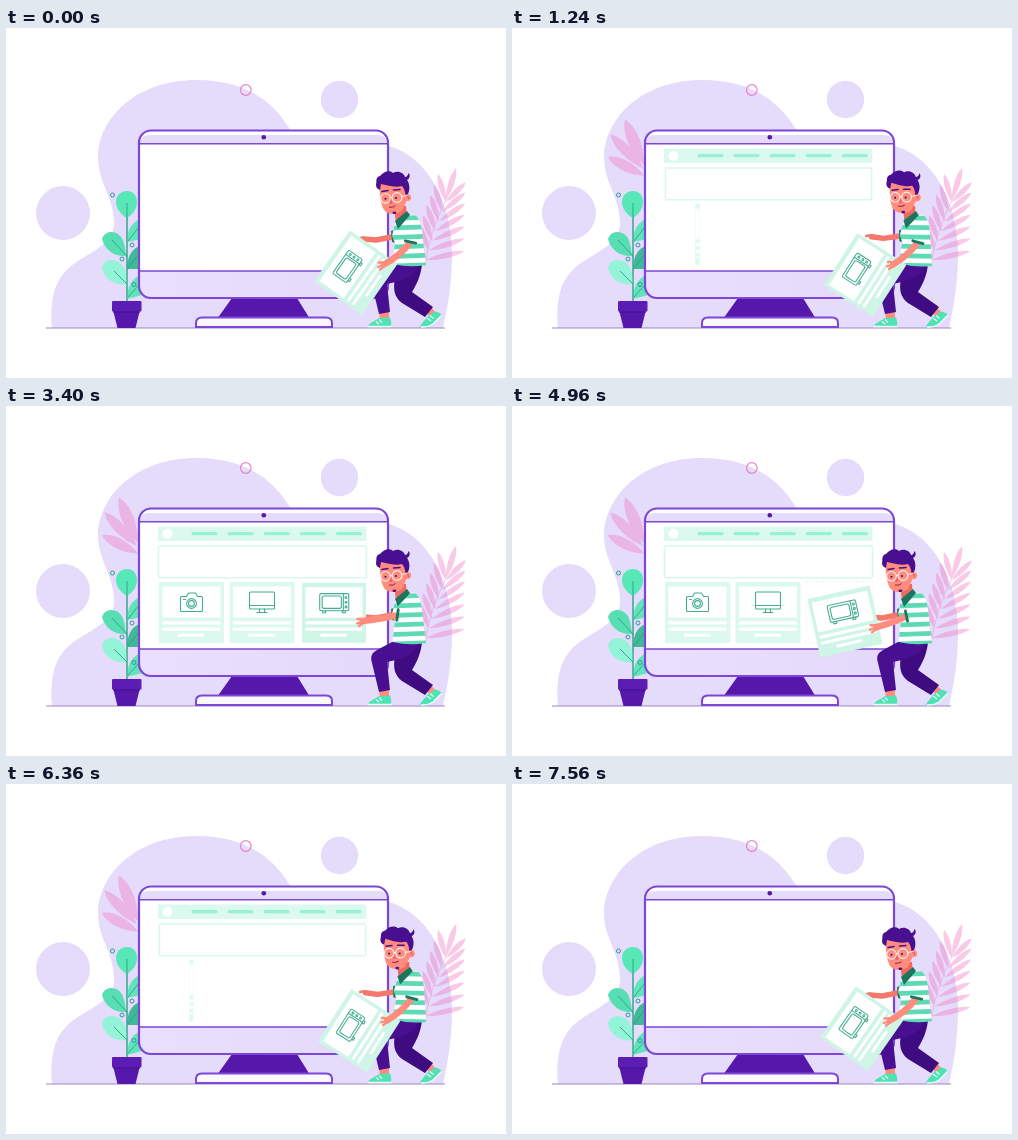
Recreate the animation shown at these times as an HTML page. Size 500x350 px, loop 7600 ms.

```html
<!DOCTYPE html>
<html lang="en">
<head>
<meta charset="utf-8">
<title>Building a shop page</title>
<style>
  html, body { margin: 0; width: 100%; height: 100%; overflow: hidden; background: #fff; }
  svg { display: block; width: 100vw; height: 100vh; }
  .icon { fill: none; stroke: #42ad90; stroke-width: 1.1; stroke-linejoin: round; stroke-linecap: round; }
  .pink { fill: #f07cc4; opacity: .4; }
  .skin { fill: #ff8c7d; }
  .round { fill: none; stroke-linecap: round; stroke-linejoin: round; }
</style>
</head>
<body>
<svg id="stage" viewBox="0 0 500 350"></svg>
<script>
const LOOP = 7600;
const PURPLE = '#7c46d8', DEEP = '#5518aa', HAIR = '#480f90', LILAC = '#e5dbfa', MINT = '#dbf9ef';

// Pointed leaf from base to tip, bulging by w on both sides.
function leaf(x, y, tx, ty, w) {
  const dx = tx - x, dy = ty - y, len = Math.hypot(dx, dy);
  const nx = -dy / len * w, ny = dx / len * w;
  const at = (k, side) => `${(x + dx * k + nx * side).toFixed(1)} ${(y + dy * k + ny * side).toFixed(1)}`;
  return `M${x} ${y}C${at(.35, 1)} ${at(.78, 1)} ${tx} ${ty}C${at(.78, -1)} ${at(.35, -1)} ${x} ${y}Z`;
}

function frond() {
  let d = '';
  for (let i = 0; i < 7; i++) {
    const k = i / 6, x = 420 + 18 * k + 2 * k * k, y = 232 - 58 * k;
    const add = (deg, len) => {
      const a = deg * Math.PI / 180;
      d += leaf(x, y, x + len * Math.cos(a), y + len * Math.sin(a), 3.7);
    };
    add(-13 - 32 * k, 39 - 11 * k);
    add(-112 + 6 * k, 26 + 3 * k);
  }
  d += leaf(440, 172, 450, 140, 4);
  return `<g class="pink"><path d="${d}"/><path d="M419 238Q423 205 441 170" fill="none" stroke="#f07cc4"/></g>`;
}

const rect = (x, y, w, h, fill, r = 0) =>
  `<rect x="${x}" y="${y}" width="${w}" height="${h}" rx="${r}" fill="${fill}"/>`;
const ring = (x, y, r, color, w) =>
  `<circle cx="${x}" cy="${y}" r="${r}" fill="none" stroke="${color}" stroke-width="${w}"/>`;

// Product card centred on the origin.
function productCard(icon, fill) {
  return rect(-32.5, -30.5, 65, 61, fill, 1.5) + rect(-29, -26, 58, 31, '#fff') +
    rect(-29, 8.7, 58, 3.2, '#fff', 1) + rect(-29, 15, 58, 3.2, '#fff', 1) +
    rect(-14, 21.3, 27, 3, '#fff', 1) + `<g class="icon">${icon}</g>`;
}

const camera = `<path d="M-10-16h5l2-3.5h7l2 3.5h4q1 0 1 1v13q0 1-1 1h-20q-1 0-1-1v-13q0-1 1-1z"/>
  <circle cy="-9" r="4.9"/><circle cy="-9" r="2.9"/><path d="M-8-13h2"/>`;
const monitor = `<rect x="-12.5" y="-20.5" width="25" height="17" rx="1"/>
  <path d="M-12.5-7h25M-2.5-3.5v3.5M2.5-3.5v3.5M-5 0h10"/>`;
const microwave = `<rect x="-14.5" y="-19.5" width="29.5" height="17.5" rx="1.5"/>
  <rect x="-12" y="-17" width="19.5" height="12.5" rx="2"/>
  <path d="M9.5-19.5v17.5M-11.5-2v2h3v-2M8.5-2v2h3v-2"/>
  <circle cx="12.2" cy="-15.5" r="1"/><circle cx="12.2" cy="-10.7" r="1"/><circle cx="12.2" cy="-6" r="1"/>`;

const navItems = [0, 1, 2, 3, 4].map(i => rect(185.5 + 36.1 * i, 126, 26, 3.3, '#97f1d3', 1.6)).join('');

const plant = `
  <path d="M121 275V178M121 229L105 214M121 255L104 240M121 238L132 226M121 212L132 198M121 268L132 256" stroke="#38ad8f" fill="none"/>
  <path d="M121 190C114 186 110 180 110 174C110 167 115 163 121 163C127 163 131 167 131 174C131 181 127 186 121 190Z" fill="#58e8b7"/>
  <path d="M120 228C110 229 99 223 96 211C98 204 106 202 112 206C118 210 119 219 120 228Z" fill="#57dfb3"/>
  <path d="M121 256C110 258 98 252 96 239C99 231 108 230 114 235C120 240 121 248 121 256Z" fill="#93f4d7"/>
  <path d="M121 214C121 203 125 194 136 190V211Z" fill="#61e4ba"/>
  <path d="M121 241C121 230 125 220 136 217V241Z" fill="#40b999"/>
  <path d="M121 271C121 259 126 250 136 246V267Z" fill="#61e4ba"/>
  <path d="M121 175V275M121 228L106 212M121 256L108 243M122 213L133 199M122 240L133 226M122 269L133 257" stroke="#30a088" stroke-width=".9" fill="none"/>
  ${[[106.5, 167], [126, 217], [116, 231], [128, 256.5]].map(([x, y]) => ring(x, y, 2, '#2b9c9b', 1)).join('')}
  <path d="M107 282H134L129.5 300H111.5Z" fill="${DEEP}"/>${rect(106, 273, 29.5, 10.5, '#5b1db3', 1)}
  <path d="M107 284H134" stroke="#43108c"/>`;

const computer = `
  <path d="M226 270H291L304 291H211Z" fill="${DEEP}"/>
  <path d="M190 299V295Q190 289.500 196 289.500H320Q326 289.500 326 295V299Z" fill="#fbf9ff" stroke="${PURPLE}" stroke-width="2"/>
  <rect x="133" y="102.500" width="249" height="167.500" rx="12" fill="#fff"/>
  <path d="M134 115.500V114Q135 107 143 107H372Q380 107 381 114V115.500Z" fill="${LILAC}"/>
  <path d="M133 243H382V258Q382 270 370 270H145Q133 270 133 258Z" fill="url(#chin)"/>
  <path d="M133 115.700H382M133 243H382" stroke="${PURPLE}" stroke-width="1.500"/>
  <rect x="133" y="102.500" width="249" height="167.500" rx="12" fill="none" stroke="${PURPLE}" stroke-width="2.200"/>
  <circle cx="257.800" cy="109.300" r="2.300" fill="${DEEP}"/>`;

const legs = `
  <path d="M373 283L374 293H383L383 282Z M420 283L424 290L430 285L425 279Z" class="skin"/>
  <path d="M391 236L416 236C415 247 411 256 406 264L427 279L419 289L396 275C388 269 387 261 389 250Z" fill="#3f0b80"/>
  <path d="M386 236H413C410 248 400 252 381 256L384 284L373 286L366 257C364 250 366 247 371 244Z" fill="${HAIR}"/>
  <path d="M362 299C362 295 368 294 373 290L384 289.500Q386 294 385 299Z" fill="#4fe3b3"/>
  <path d="M361.500 298.500H385.500M373 291.500L376 294.500M370 293.500L373 296" stroke="#e9fff7" stroke-width="1.300"/>
  <path d="M414 299C415 295 419 293 421 289L429 283.500Q434 284 435.500 287L427 296Q423 299 414 299Z" fill="#4fe3b3"/>
  <path d="M415 299Q423 299 427 296L435.500 287.500M421 290L425 293M424 287.500L427.500 290.500" stroke="#e9fff7" stroke-width="1.300" fill="none"/>`;

const torso = `
  <path d="M388 208.500L370 212L358 211" class="round" stroke="#f4786c" stroke-width="5.500"/>
  <path d="M357 209.500L352.500 210.500" class="round" stroke="#f4786c" stroke-width="2.500"/>
  <path d="M385 203L391 201V215L386 214Z" fill="#1d7560"/>
  <path d="M388 178H400L401 192L390 195Z" fill="#f0695f"/>
  <path d="M390 192C396 188 404 186 409 187C415 191 416 202 417 212L420 237Q404 240 386.500 236L389 215L386 208Z" fill="url(#stripes)"/>
  <path d="M389 193L401 183L404 187L392 201Z" fill="#1d7560"/>`;

const head = `
  <path d="M373.500 157C373.500 166 374.500 176 378 182C382 187 391 187 396 183L401 172L400 154L386 151Z" class="skin"/>
  <circle cx="401.500" cy="169.500" r="3.600" class="skin"/>
  <path d="M400.500 168.500Q403 168 402.500 171" stroke="#d94c55" stroke-width=".8" fill="none"/>
  <path d="M370 157C371 154 369 149 374 148C378 143 384 142 387 145C392 142 398 145 399 149C401 149 402 147 402.500 145C405 148 403 151 401 152C404 156 404 162 402 166L399.500 167C399 163 398 160 396 158C388 160 380 157 375 156L374 162C371 161 370 159 370 157Z" fill="${HAIR}"/>
  <path d="M376 163.500L382 162.500M387.500 162L394 161.500" stroke="${HAIR}" stroke-width="1.500" stroke-linecap="round"/>
  <circle cx="379.500" cy="170.700" r="1" fill="#35106b"/><circle cx="390" cy="170" r="1" fill="#35106b"/>
  <path d="M384.500 169L383 175Q384.500 176.500 386.500 175.500" fill="#f0605f"/>
  ${ring(379.500, 170.300, 4.800, '#fff0ee', 1.100)}${ring(391, 169.500, 4.900, '#fff0ee', 1.100)}
  <path d="M384.300 169.500H386.200M395.800 168.500L401 167.500" stroke="#fff0ee" stroke-width="1.100"/>
  <path d="M383 179Q387 180 389.500 177.500" stroke="#8c1f4c" fill="none" stroke-width="1"/>
  <path d="M386.500 184Q388.500 183 390.500 184L389.500 186H387Z" fill="${HAIR}"/>`;

const leftLeaves = leaf(132, 137, 113, 91.500, 8) + leaf(131, 140, 98.500, 106.500, 7) + leaf(132, 147.500, 96, 129, 7);

const stage = document.getElementById('stage');
stage.innerHTML = `
  <defs>
    <linearGradient id="chin"><stop stop-color="#eadffc"/><stop offset="1" stop-color="#e4d9fa"/></linearGradient>
    <pattern id="stripes" width="60" height="9.500" patternUnits="userSpaceOnUse" patternTransform="translate(0 2) rotate(-2)">
      ${rect(0, 0, 60, 9.500, '#fff')}${rect(0, 0, 60, 4.700, '#5cdab4')}
    </pattern>
    <clipPath id="screen"><rect x="134" y="116.500" width="247" height="126"/></clipPath>
  </defs>
  <rect width="500" height="350" fill="#fff"/>
  <g fill="${LILAC}">
    <path d="M46 300C43 264 52 247 69 235C90 221 110 214 108 192C106 165 92 155 92 128C93 90 130 52 190 52C245 52 270 78 285 103L383 118C425 130 446 180 446 225C446 262 440 285 437 300Z"/>
    <circle cx="57" cy="185" r="27"/><circle cx="333.500" cy="71.500" r="18.700"/>
  </g>
  ${ring(239.800, 62, 5.300, '#e584cd', 1.200)}
  ${frond()}
  <path id="leaves" class="pink" d="${leftLeaves}"/>
  <path d="M40 300H439" stroke="#9d86c6" stroke-width="1.200"/>
  ${plant}${computer}
  <g clip-path="url(#screen)">
    <g id="nav">${rect(152, 120.500, 208.500, 14.500, MINT)}<circle cx="161.500" cy="127.700" r="5" fill="#fff"/>${navItems}</g>
    <rect id="banner" x="152.500" y="140" width="208" height="31.700" rx="1" fill="#fff" stroke="#d9f8ee" stroke-width="1.600"/>
    <g id="card1">${productCard(camera, MINT)}</g>
    <g id="card2">${productCard(monitor, MINT)}</g>
    <rect id="slot" x="-33.500" y="-31" width="67" height="61.500" fill="none" stroke="#c6b2ee" stroke-width=".8" stroke-dasharray="3 2"/>
  </g>
  ${legs}
  <g id="body">${torso}${head}</g>
  <g id="held">${productCard(microwave, '#cef5e6')}</g>
  <g id="arm">
    <path id="forearm" class="round" stroke="#ff8c7d" stroke-width="6.500"/>
    <path id="fingers" class="round" stroke="#ff8c7d" stroke-width="2.300"/>
    <path id="sleeve" stroke="url(#stripes)" stroke-width="12.500"/>
    <path id="cuff" class="round" stroke="#1d7560" stroke-width="2.800"/>
  </g>`;

const part = {};
stage.querySelectorAll('[id]').forEach(node => part[node.id] = node);
const set = (id, name, value) => part[id].setAttribute(name, value);
const move = (id, value) => set(id, 'transform', value);
const mix = (a, b, k) => a + (b - a) * k;
const clamp = k => Math.max(0, Math.min(1, k));
const smooth = k => { k = clamp(k); return k * k * (3 - 2 * k); };
const hump = (ms, span) => ms < span ? Math.sin(Math.PI * ms / span) ** 2 : 0;

// Damped spring from 0 to 1 with one visible overshoot.
function spring(ms) {
  const s = ms / 1000;
  return s <= 0 ? 0 : 1 - Math.exp(-6 * s) * Math.cos(7.85 * s);
}

function openCard(id, x, ms) {
  const width = spring(ms);
  move(id, `translate(${x} 206.500) scale(${width} 1)`);
  part[id].querySelector('.icon').setAttribute('opacity', clamp(width * 2 - .2));
}

function draw(time) {
  const t = time % LOOP;
  const u = t < LOOP / 2 ? t : LOOP - t;

  const grow = spring(u - 100);
  move('leaves', `translate(134 148) scale(${grow}) translate(-134 -148)`);
  const stretch = (id, x, start) => move(id, `translate(${x} 0) scale(${spring(u - start)} 1) translate(${-x} 0)`);
  stretch('nav', 152, 280);
  stretch('banner', 256.5, 580);
  openCard('card1', 185.5, u - 1230);
  openCard('card2', 256, u - 1400);

  const sway = hump(u, 1920), drag = hump(u, 1640);
  const place = smooth((u - 2280) / 520);
  move('slot', `translate(327.500 206.500) scale(${spring(u - 1620)} 1)`);
  set('slot', 'opacity', clamp((u - 1620) / 400) * (1 - place));

  const lean = `rotate(${3.7 * sway} 402 240)`;
  move('body', lean);
  move('arm', lean);

  const x = mix(349.8 + 7 * drag, 328, place), y = mix(244.6 + 5 * drag, 206.8, place);
  move('held', `translate(${x} ${y}) rotate(${mix(-55 - 5 * drag, 0, place)}) scale(${mix(.96, .985, place)})`);

  // Upper arm ends at the cuff; the forearm runs from there to the hand.
  const press = place * (u - 3400) / 1000;
  const hx = mix(378 + 4 * sway, 357 - 5 * press, place), hy = mix(236.5 + sway, 215 - 3 * press, place);
  const cx = mix(404.5, 391.5, place), cy = mix(214, 209, place);
  const turn = mix(12, 98, place) * Math.PI / 180;
  const rx = 5.3 * Math.cos(turn), ry = 5.3 * Math.sin(turn);
  const ex = mix(cx, hx, .4), ey = mix(cy, hy, .4) + mix(5, 1, place);
  set('sleeve', 'd', `M406 195L${cx} ${cy}`);
  set('cuff', 'd', `M${cx - rx} ${cy - ry}L${cx + rx} ${cy + ry}`);
  set('forearm', 'd', `M${cx} ${cy}Q${ex} ${ey} ${hx} ${hy}`);
  set('fingers', 'd', `M${hx} ${hy - 2}l-5.500 0M${hx} ${hy}l-6 2.500M${hx} ${hy + 2}l-4 3`);
}

const begin = performance.now();
function tick() {
  draw(performance.now() - begin);
  requestAnimationFrame(tick);
}
draw(0);
requestAnimationFrame(tick);
</script>
</body>
</html>
```
